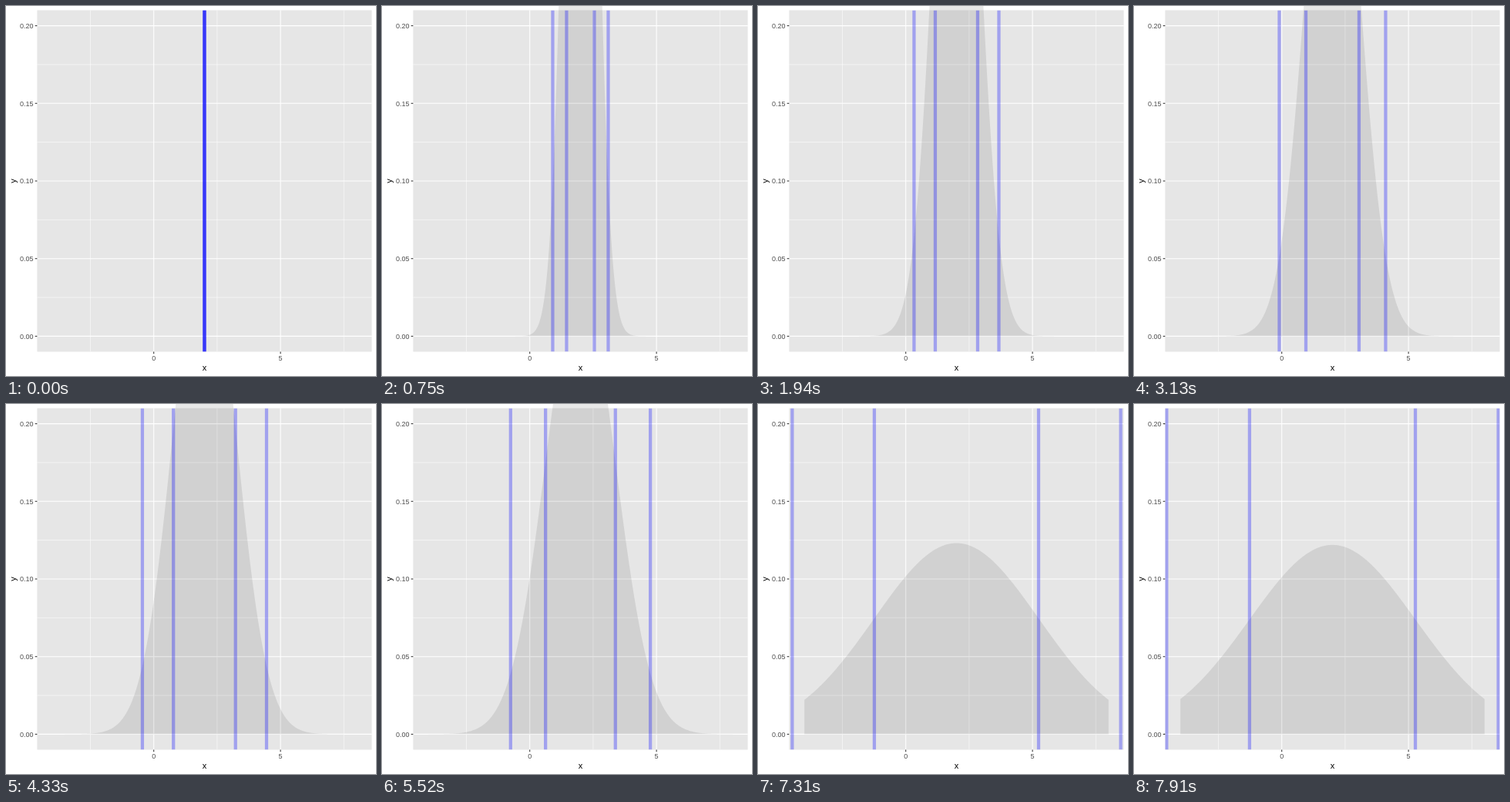
Recreate the animation shown at these times as an HTML page. Size 480 by 480 pixels, loop 8 s.

```html
<!DOCTYPE html>
<html lang="en">
<head>
<meta charset="utf-8">
<title>Normal density with growing variance</title>
<style>
  html, body { margin: 0; width: 100%; height: 100%; overflow: hidden; background: #fff; }
  svg { display: block; width: 100vw; height: 100vh; }
  text { font-family: "Liberation Sans", Arial, Helvetica, sans-serif; }
  .tick { font-size: 9px; fill: #4d4d4d; }
  .title { font-size: 11px; fill: #000; text-anchor: middle; }
</style>
</head>
<body>
<svg viewBox="0 0 480 480">
  <defs><clipPath id="panel"><rect x="40.4" y="5.5" width="434.1" height="443"/></clipPath></defs>
  <rect x="40.4" y="5.5" width="434.1" height="443" fill="#e6e6e6"/>
  <g id="grid" stroke="#fff"></g>
  <path id="area" fill="#000" fill-opacity=".09"/>
  <g id="bars" stroke="#00f" stroke-opacity=".3" stroke-width="4.27" clip-path="url(#panel)"></g>
  <g id="axes" stroke="#333" stroke-width="1.07"></g>
  <g id="labels" class="tick"></g>
  <text class="title" x="257.5" y="473">x</text>
  <text class="title" transform="translate(13 227) rotate(-90)">y</text>
</svg>
<script>
const LOOP = 8000, MEAN = 2;
const LEFT = 40.4, RIGHT = 474.5, TOP = 5.5, BOTTOM = 448.5;
const px = x => 191.7 + x * 32.88;
const py = y => 428.4 - y * 2014;
const $ = id => document.getElementById(id);

function add(parent, tag, attrs, text) {
  const el = document.createElementNS("http://www.w3.org/2000/svg", tag);
  for (const k in attrs) el.setAttribute(k, attrs[k]);
  if (text) el.textContent = text;
  return $(parent).appendChild(el);
}
const line = (parent, x1, y1, x2, y2, more) => add(parent, "line", { x1, y1, x2, y2, ...more });
const vGrid = (x, w) => line("grid", px(x), TOP, px(x), BOTTOM, { "stroke-width": w });
const hGrid = (y, w) => line("grid", LEFT, py(y), RIGHT, py(y), { "stroke-width": w });

[-2.5, 2.5, 7.5].forEach(x => vGrid(x, 0.53));
for (let i = 0; i < 4; i++) hGrid(0.025 + i * 0.05, 0.53);
[0, 5].forEach(x => {
  vGrid(x, 1.07);
  line("axes", px(x), BOTTOM, px(x), BOTTOM + 2.7);
  add("labels", "text", { x: px(x), y: 460, "text-anchor": "middle" }, String(x));
});
for (let i = 0; i <= 4; i++) {
  const y = i * 0.05;
  hGrid(y, 1.07);
  line("axes", LEFT - 2.7, py(y), LEFT, py(y));
  add("labels", "text", { x: 35.5, y: py(y) + 3.2, "text-anchor": "end" }, y.toFixed(2));
}

const bars = [-2, -1, 1, 2].map(k => ({ k, el: line("bars", 0, TOP, 0, BOTTOM) }));

// Variance grows by 0.1 per step and jumps from 1.9 to 10.
const variance = step => (step < 20 ? step : step + 80) / 10;
const startOf = step => step ? 10 * Math.round((148 + 298.5 * (step - 1)) / 10) : 0;

function areaPath(sd) {
  if (!sd) return "";
  let d = `M${px(-4)} ${py(0)}`;
  for (let i = 0; i <= 480; i++) {
    const x = -4 + i / 40, z = (x - MEAN) / sd;
    const y = Math.exp(-z * z / 2) / (sd * Math.sqrt(2 * Math.PI));
    d += `L${px(x).toFixed(2)} ${py(y).toFixed(2)}`;
  }
  return d + `L${px(8)} ${py(0)}Z`;
}

let shown = -1;
function draw(t) {
  let step = 0;
  while (step < 27 && t >= startOf(step + 1)) step++;
  if (step === shown) return;
  shown = step;
  const sd = Math.sqrt(variance(step));
  $("area").setAttribute("d", areaPath(sd));
  for (const { k, el } of bars) {
    const x = px(MEAN + k * sd);
    el.setAttribute("x1", x);
    el.setAttribute("x2", x);
  }
}

function tick() {
  draw(performance.now() % LOOP);
  requestAnimationFrame(tick);
}
draw(0);
requestAnimationFrame(tick);
</script>
</body>
</html>
```
